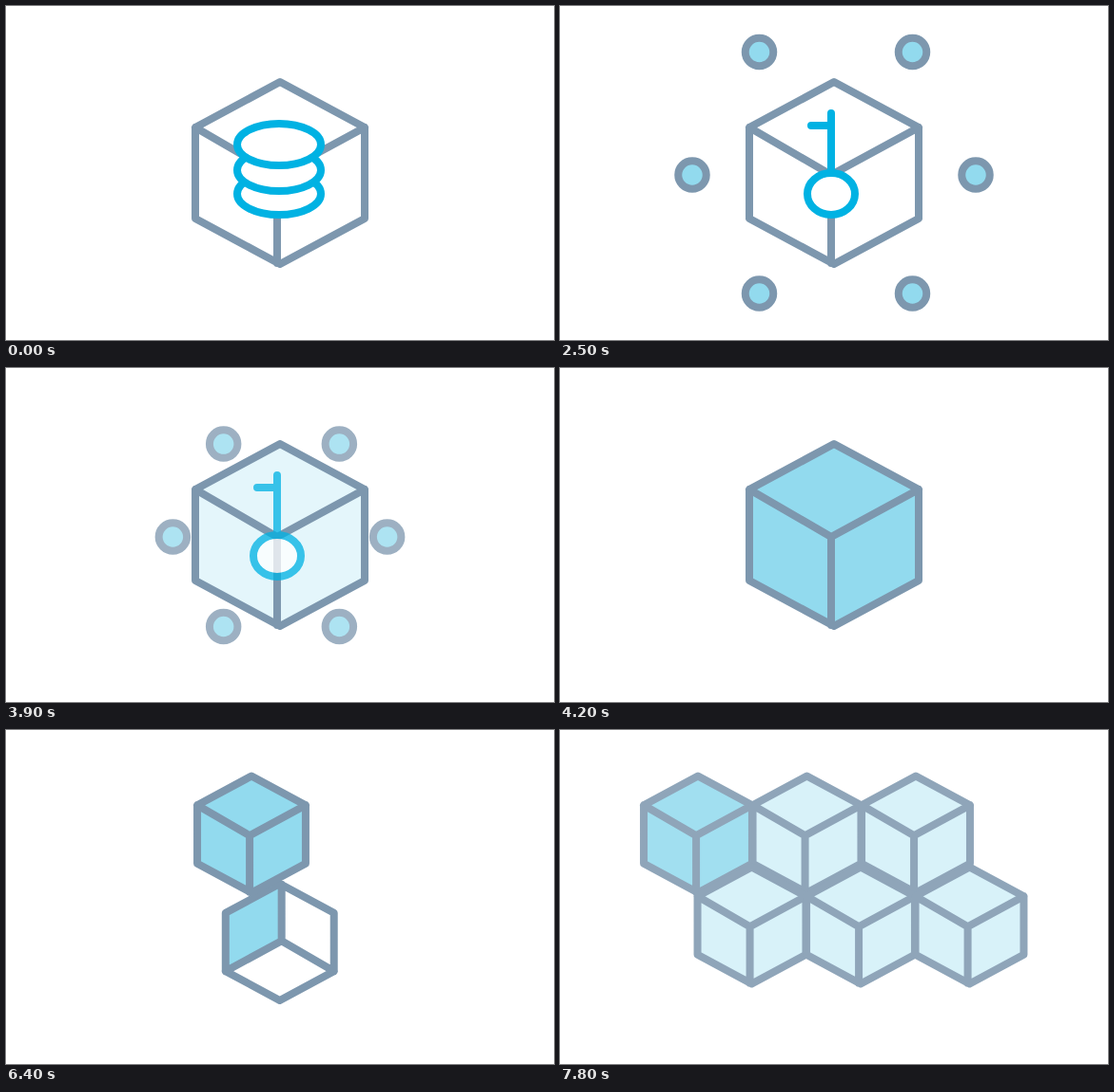
Animation of 576 by 352 pixels, one loop 8 s. Source, as an HTML page:

```html
<!DOCTYPE html>
<html lang="en">
<head>
<meta charset="utf-8">
<title>Data blocks</title>
<style>
  html, body { margin: 0; width: 100%; height: 100%; overflow: hidden; background: #fff; }
  svg { display: block; width: 100vw; height: 100vh; }
  g, path, ellipse, circle { vector-effect: non-scaling-stroke; }
  .line { fill: none; stroke: #7d97ae; stroke-width: 8; stroke-linecap: round; stroke-linejoin: round; }
  .face { fill: #92daee; }
  .blue { fill: #fff; stroke: #00b2e3; stroke-width: 8; stroke-linecap: round; stroke-linejoin: round; }
  .dot { fill: #92daee; stroke: #7d97ae; stroke-width: 8; }
</style>
</head>
<body>
<svg id="stage" viewBox="0 0 576 352">
  <g id="dots"></g>
  <g id="bigCube"></g>
  <g id="database" class="blue">
    <ellipse cx="287" cy="198" rx="44" ry="22"/>
    <ellipse cx="287" cy="173" rx="44" ry="22"/>
    <ellipse cx="287" cy="146" rx="44" ry="22"/>
  </g>
  <g id="key" class="blue">
    <path d="M285 172V113M285 126H264"/>
    <ellipse cx="285" cy="198" rx="25" ry="22"/>
  </g>
  <g id="openBox"></g>
  <g id="chain"><g id="firstCube"></g><g id="grid"></g></g>
</svg>
<script>
const LOOP = 8000, STEP = 100, SMALL = 0.64;
const HEXAGON = 'M0-96L89-48V48L0 96L-89 48V-48Z';
const EDGES = HEXAGON + 'M-89-48L-3 2L89-48M-3 2V95';
const RIGHT_FACE = 'M89-48L-3 2L0 96L89 48Z';
const DOT_OFFSETS = [[-78.5, -129.5], [82.5, -129.5], [149, 0], [82.5, 125], [-78.5, 125], [-149, 0]];

const byId = id => document.getElementById(id);
const [dots, bigCube, database, key, openBox, chain, firstCube, grid] =
  ['dots', 'bigCube', 'database', 'key', 'openBox', 'chain', 'firstCube', 'grid'].map(byId);

function add(parent, tag, attributes) {
  const node = document.createElementNS('http://www.w3.org/2000/svg', tag);
  for (const name in attributes) node.setAttribute(name, attributes[name]);
  return parent.appendChild(node);
}

function buildCube(parent, face = HEXAGON) {
  add(parent, 'path', { d: EDGES, class: 'line' });
  const fill = add(parent, 'path', { d: face, class: 'face' });
  parent.prepend(fill);
  return fill;
}

const place = (node, x, y, scale = 1) =>
  node.setAttribute('transform', `translate(${x} ${y}) scale(${scale})`);

function show(node, opacity) {
  node.style.display = opacity > 0 ? '' : 'none';
  node.style.opacity = opacity;
}

const mix = (a, b, p) => a + (b - a) * p;
const easeIn = p => p ** 3;
const easeOut = (p, power) => 1 - (1 - p) ** power;
const easeInOut = p => p * p * (3 - 2 * p);

const dotNodes = DOT_OFFSETS.map(() => add(dots, 'circle', { r: 14.75, class: 'dot' }));
const bigFill = buildCube(bigCube);
place(bigCube, 288, 176);
buildCube(firstCube);
buildCube(openBox, RIGHT_FACE);

const gridFills = [];
for (const [x, y] of [[372.5, 110], [487, 110], [314.5, 206], [429, 206], [543.5, 206]]) {
  const cube = add(grid, 'g', {});
  gridFills.push(buildCube(cube));
  place(cube, x, y, SMALL);
}

function draw(time) {
  const progress = (from, to) => Math.min(1, Math.max(0, (time - from) / (to - from)));

  // Dots spread out, then are absorbed while the cube fills.
  const absorbed = easeIn(progress(3400, 4200));
  const spread = easeOut(progress(400, 1200), 3) * (1 - absorbed);
  dotNodes.forEach((dot, i) => {
    const [x, y] = DOT_OFFSETS[i];
    place(dot, 288 + x * spread, 178 + y * spread);
  });
  show(dots, spread);
  show(bigFill, absorbed);

  const swap = progress(2100, 2500);
  show(database, 1 - swap);
  show(key, swap * (1 - absorbed));

  // The filled cube becomes the first small block, joined by an open box.
  const small = time >= 5200;
  const rise = easeOut(progress(5100, 5400), 2);
  show(bigCube, small ? 0 : 1);
  show(firstCube, small ? 1 : 0);
  place(firstCube, mix(288, 258, rise), mix(188, 110, rise), mix(0.667, SMALL, rise));

  const dock = progress(6300, 6500);
  place(openBox, mix(258, 317.5, dock), mix(240, 207, dock), -SMALL);
  show(openBox, progress(5200, 5400) * (1 - progress(6900, 7600)));

  // The grid joins in, slides left and takes on colour.
  show(grid, progress(6900, 7300));
  const tint = 0.42 * progress(7500, 7800);
  gridFills.forEach(fill => show(fill, tint));
  place(chain, -113 * easeInOut(progress(7300, 7800)), 0);
  show(chain, 1 - 0.14 * progress(7700, 7800));
}

const start = performance.now();
function tick() {
  const elapsed = (performance.now() - start) % LOOP;
  draw(Math.floor(elapsed / STEP) * STEP);
  requestAnimationFrame(tick);
}
tick();
</script>
</body>
</html>
```
